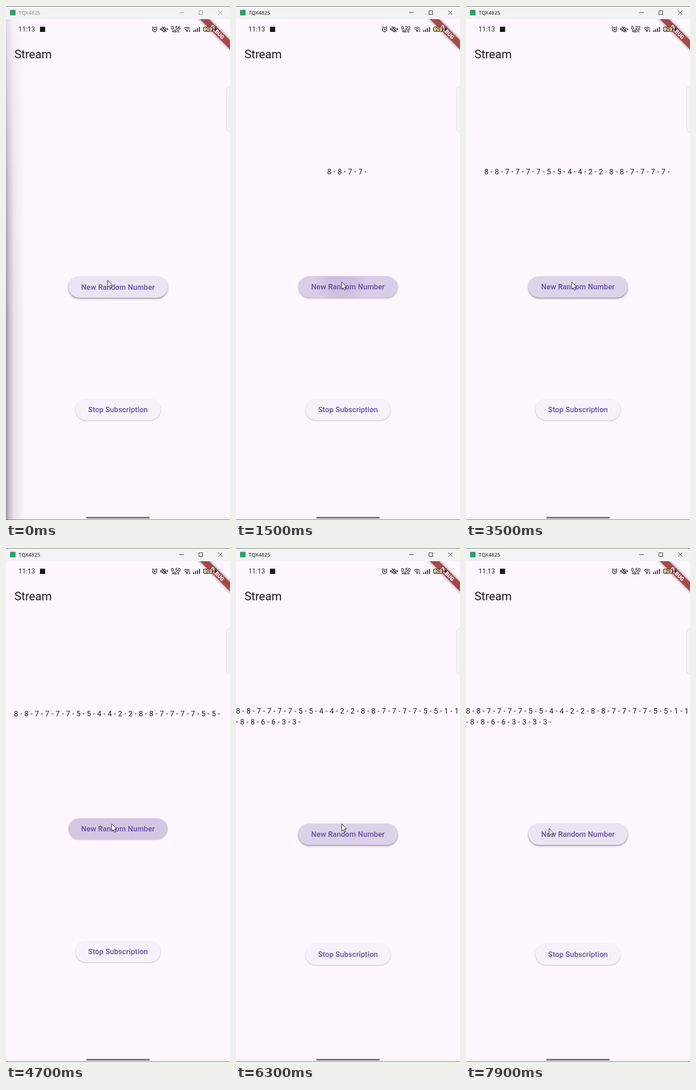
Write an HTML page that moves like this. It is 495x1130 px and loops after 8000 ms.

```html
<!DOCTYPE html>
<html lang="en">
<head>
<meta charset="utf-8">
<title>Stream</title>
<style>
  html, body { margin: 0; width: 100%; height: 100%; overflow: hidden; background: #fef7ff; }
  svg { display: block; width: 495px; height: 1130px; font-family: Roboto, sans-serif; }
  text { white-space: pre; }
  .label { font-size: 16.38px; font-weight: 500; letter-spacing: .117px; text-anchor: middle; fill: #6750a4; }
  .numbers { font-size: 16.38px; letter-spacing: .2925px; fill: #1d1b20; }
  .line { fill: none; stroke: #1b181c; stroke-width: 1.4; }
</style>
</head>
<body>
<svg viewBox="0 0 495 1130">
  <defs>
    <filter id="soft" x="-20%" y="-40%" width="140%" height="200%"><feGaussianBlur stdDeviation="2"/></filter>
    <filter id="thin" x="-20%" y="-40%" width="140%" height="200%"><feGaussianBlur stdDeviation=".9"/></filter>
    <filter id="ribbon" x="-20%" y="-100%" width="140%" height="300%"><feGaussianBlur stdDeviation="3"/></filter>
    <linearGradient id="edge">
      <stop stop-color="#555058" stop-opacity=".62"/>
      <stop offset=".12" stop-color="#555058" stop-opacity=".38"/>
      <stop offset=".4" stop-color="#555058" stop-opacity=".13"/>
      <stop offset="1" stop-color="#555058" stop-opacity="0"/>
    </linearGradient>
    <linearGradient id="fall" x2="0" y2="1">
      <stop stop-color="#fff" stop-opacity=".3"/>
      <stop offset=".3" stop-color="#fff" stop-opacity=".75"/>
      <stop offset=".6" stop-color="#fff"/>
    </linearGradient>
    <mask id="fade"><rect y="29" width="50" height="1100" fill="url(#fall)"/></mask>
    <radialGradient id="glow">
      <stop offset=".45" stop-color="#b9a9d8"/>
      <stop offset="1" stop-color="#b9a9d8" stop-opacity="0"/>
    </radialGradient>
    <clipPath id="pill"><rect x="138" y="594.6" width="219" height="46.8" rx="23.4"/></clipPath>
    <clipPath id="screen"><rect y="29" width="495" height="1100"/></clipPath>
  </defs>

  <rect width="495" height="1130" fill="#fef7ff"/>
  <text x="18.7" y="114.8" font-size="25.74" fill="#1d1b20">Stream</text>
  <rect x="487.5" y="176.5" width="20" height="101" rx="7" fill="#f7f2f8" stroke="#dfdae1"/>

  <text id="row1" class="numbers" y="370.3"></text>
  <text id="row2" class="numbers" x="0" y="387.7"></text>

  <g id="newButton">
    <rect x="138" y="595.4" width="219" height="46.8" rx="23.4" fill="#000" opacity=".25" filter="url(#thin)"/>
    <rect id="lift" x="138" y="597" width="219" height="46.8" rx="23.4" fill="#000" filter="url(#soft)"/>
    <rect id="face" x="138" y="594.6" width="219" height="46.8" rx="23.4"/>
    <g clip-path="url(#pill)"><circle id="ripple" fill="url(#glow)"/></g>
    <text class="label" x="247.5" y="623.8">New Random Number</text>
  </g>
  <g id="stopButton">
    <rect x="153.5" y="865.3" width="188" height="46.4" rx="23.2" fill="#000" opacity=".3" filter="url(#thin)"/>
    <rect x="153.5" y="864.1" width="188" height="46.8" rx="23.4" fill="#f7f2fa"/>
    <text class="label" x="247.5" y="893.4">Stop Subscription</text>
  </g>

  <g clip-path="url(#screen)">
    <g transform="translate(495 29) rotate(45)">
      <rect x="-60" y="32.8" width="120" height="14" fill="#000" opacity=".55" filter="url(#ribbon)"/>
      <rect x="-60" y="32.8" width="120" height="14" fill="#a9474b"/>
      <text y="44" font-size="11.9" font-weight="900" text-anchor="middle" fill="#fff">DEBUG</text>
    </g>
  </g>

  <g fill="#1b181c">
    <text x="27.5" y="56.2" font-size="14.4" letter-spacing=".2">11:13</text>
    <rect x="75" y="45.5" width="11.5" height="11.5"/>
    <g class="line">
      <circle cx="328.5" cy="51.8" r="4.7"/>
      <path d="M328.5 49v3.2h2.4M322.8 47.6l2.6-2.4M334.2 47.6l-2.6-2.4"/>
      <path d="M345.5 54.5c1.5-1.5.5-8 4-8s2.500 6.500 4 8zM348 56.500h3M344.500 45l10 12M341.500 49v4M343.500 48v6M355.500 48v5M357.500 49.500v3"/>
      <path d="M393.500 49.200q6.500-5 13 0M395.800 52q4.200-3.200 7.500-1"/>
      <rect x="436.500" y="46" width="19.500" height="10" rx="3" fill="#ddd0a0" stroke-width="1.200"/>
    </g>
    <path d="M397.500 54q2.500-2 5 0l-2.500 3zM404 52h3v1.500h-3zM404 55h3v1.500h-3z"/>
    <path d="M414 53.500h2V57h-2zM418 51.500h2V57h-2zM422 49h2v8h-2zM426.500 46h2V57h-2zM457 49h1.500v4H457zM464 45l-4.500 7h3l-1.500 5 6-7.500h-3.500l2-4.500z"/>
    <text id="speed" x="375.2" y="51.600" font-size="10.600" font-weight="500" text-anchor="middle"></text>
    <text x="375.2" y="58.400" font-size="7" font-weight="700" text-anchor="middle">KB/S</text>
    <text x="446.300" y="54.800" font-size="10" text-anchor="middle">29</text>
  </g>

  <rect x="177" y="1123" width="141" height="4" rx="2" fill="#7d797f"/>
  <rect id="sideShade" y="29" width="42" height="1100" fill="url(#edge)" mask="url(#fade)"/>

  <rect width="495" height="29" fill="#f3f3f3"/>
  <path d="M0 .5h495M0 1129.500h495" stroke="#66636a"/>
  <rect x="9" y="8.500" width="12" height="12" fill="#2a9d6c"/>
  <g id="chrome">
    <text x="28" y="18.700" font-size="11.500" font-family="Open Sans, sans-serif">TQX4825</text>
    <path d="M383 14.500h10M426.500 10.500h8v8h-8zM469 10l9 9M478 10l-9 9" fill="none" stroke="currentColor"/>
  </g>

  <path id="cursor" d="M.5.500V16.500L4.200 13 6.700 18.800 9.200 17.700 6.700 12.100H11.500Z" fill="#fff" stroke="#111"/>
</svg>
<script>
const LOOP = 8000, STEP = 100;
const drawn = [8, 7, 7, 5, 4, 2, 8, 7, 7, 5, 1, 8, 6, 3, 3];
// Press and release time of every click; each release adds its digit twice.
const clicks = [[300, 900]];
for (let t = 1300; t <= 3400; t += 300) clicks.push([t - 180, t]);
clicks.push([3850, 4000], [4450, 4800], [5050, 5200], [5550, 5700], [6050, 6200], [6850, 7000]);

const el = id => document.getElementById(id);
const clamp = v => Math.min(1, Math.max(0, v));
const mix = (a, b, k) => a + (b - a) * k;
const ease = k => k * k * (3 - 2 * k);
const set = (id, attrs) => {
  for (const name in attrs) el(id).setAttribute(name, attrs[name]);
};

function drawNumbers(t) {
  const count = clicks.filter(c => t >= c[1]).length;
  const items = drawn.slice(0, count).flatMap(d => [d, d]);
  const wrapped = items.length > 21;
  const rest = items.slice(22);
  el('row1').textContent = wrapped ? items.slice(0, 22).join(' - ') : items.map(d => d + ' - ').join('');
  el('row2').textContent = wrapped ? '- ' + rest.map(d => d + ' - ').join('') : '';
  set('row1', { x: wrapped ? 0 : 247.5 - 11.5 * items.length, y: wrapped ? 364.2 : 370.3 });
  const shift = wrapped ? 11.4 : count ? -0.5 : 0;
  set('newButton', { transform: `translate(0 ${shift})` });
  set('stopButton', { transform: `translate(0 ${wrapped ? 5.8 : 0})` });
  return shift;
}

function drawPress(t, x, y) {
  let level = 0, last = null;
  for (const [down, up] of clicks) {
    if (t < down) continue;
    last = down;
    level = Math.max(level, clamp((t - down) / 100) * clamp(1 - (t - up) / 250));
  }
  const rgb = [[235, 228, 243], [212, 201, 228]];
  set('face', { fill: `rgb(${rgb[0].map((v, i) => mix(v, rgb[1][i], level))})` });
  set('lift', { opacity: 0.3 * clamp((1 - level) / 0.4) });
  const age = last === null ? 1 : clamp((t - last) / 280);
  set('ripple', { cx: x, cy: y, r: mix(20, 160, age), opacity: 0.55 * (1 - age) });
}

function draw(t) {
  const active = t >= 300;
  const arrive = ease(clamp((t - 50) / 250)), leave = ease(clamp((t - 7300) / 500));
  const x = mix(mix(224, 233, arrive), 183, leave);
  const y = mix(mix(602, 606, arrive), 616, leave);
  set('cursor', { transform: `translate(${x} ${y})` });
  set('chrome', { fill: active ? '#111' : '#8a8a8a', color: active ? '#111' : '#8a8a8a' });
  set('sideShade', { opacity: active ? 0 : 1 });
  el('speed').textContent = !active ? '0.56' : t < 4000 ? '0.22' : '0.50';
  const shift = drawNumbers(t);
  drawPress(t, x, y - shift);
}

const start = performance.now();
function tick() {
  const t = (performance.now() - start) % LOOP;
  draw(Math.floor(t / STEP) * STEP);
  requestAnimationFrame(tick);
}
tick();
</script>
</body>
</html>
```
